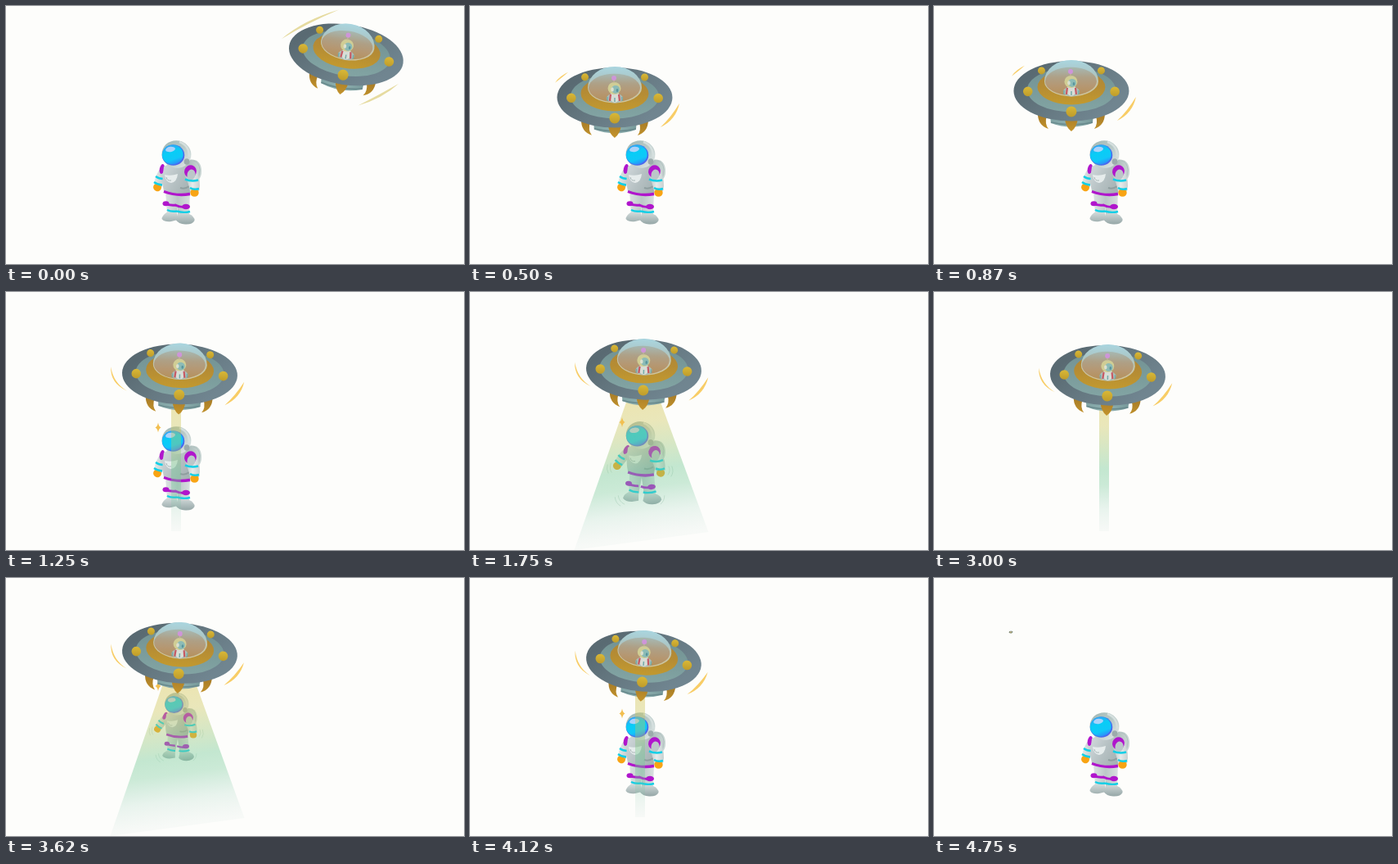
These frames come from a looping animation (560 px wide and 315 px high, 5 s). An HTML page with a canvas:

```html
<!DOCTYPE html>
<html lang="en">
<head>
<meta charset="utf-8">
<title>Abduction</title>
<style>
  html, body { margin: 0; width: 100%; height: 100%; overflow: hidden; background: #fdfdfb; }
  canvas { display: block; }
</style>
</head>
<body>
<canvas id="stage" width="560" height="315"></canvas>
<script>
const g = document.getElementById('stage').getContext('2d');
const LOOP = 5000, STEP = 125;
const HELD = new Set([1, 3, 5, 13, 22, 23, 39]);   // steps that repeat the pose before them
const PURPLE = '#b016cc', CYAN = '#12cfe6', ORANGE = '#f8a414';

const clamp = v => Math.max(0, Math.min(1, v));
const mix = (a, b, f) => a + (b - a) * f;
const easeOut = f => Math.sin(clamp(f) * Math.PI / 2);

// Where the ship is at a step: swoop in, swing back, hover, shrink into the distance.
function flight(s) {
  if (s < 6) {
    const f = easeOut(s / 6);
    return { x: mix(416, 140, f), y: mix(58.5, 105, f) + 14 * Math.sin(s / 6 * Math.PI), tilt: mix(8.7, -1.2, f), scale: 1 };
  }
  if (s < 10) {
    const f = easeOut((s - 6) / 4);
    return { x: mix(140, 213, f), y: mix(105, 99.5, f), tilt: mix(-1.2, 2, f), scale: 1 };
  }
  if (s <= 33) {
    const climb = (from, to, height) => s >= from && s < to ? height * (s - from) / (to - from) : 0;
    return {
      x: 212.5,
      y: 101 - climb(9, 19, 14) - climb(19, 22, 20) - climb(24, 33, 18),
      tilt: 1.6 + .3 * Math.max(0, s - 24),
      scale: 1
    };
  }
  const f = (s - 33) / 5;
  return { x: mix(212.5, 94, f), y: mix(100, 66, easeOut(f)), tilt: 4.3 - 10 * f, scale: 1 - .965 * f * f };
}

// Share of the way from the ground to the ship.
const riseAt = s => Math.pow(clamp((s < 23 ? s - 13 : 32 - s) / 5), 1.5);

// 0 is off, 1 a thin ray, 2 a cone, 3 the full slanted cone.
function beamLevel(s) {
  const pulse = (from, to) => Math.min(s - from, to - s, 3);
  return Math.max(0, pulse(9, 21), pulse(23, 34));
}

function grad(x0, y0, x1, y1, ...colors) {
  const l = g.createLinearGradient(x0, y0, x1, y1);
  colors.forEach((c, i) => l.addColorStop(i / (colors.length - 1), c));
  return l;
}
function ell(x, y, rx, ry, fill, turn = 0) {
  g.beginPath();
  g.ellipse(x, y, rx, ry, turn, 0, 7);
  g.fillStyle = fill;
  g.fill();
}
function shape(d, fill) {
  g.fillStyle = fill;
  g.fill(new Path2D(d));
}
function line(d, color, width) {
  g.strokeStyle = color;
  g.lineWidth = width;
  g.stroke(new Path2D(d));
}
function around(x, y, angle, draw) {
  g.save();
  g.translate(x, y);
  g.rotate(angle);
  g.translate(-x, -y);
  draw();
  g.restore();
}

// Crescent from one point to another, thickest in the middle.
function streak(x1, y1, cx, cy, x2, y2, width, color) {
  const k = 1 - width / Math.hypot(cx, cy);
  shape(`M${x1} ${y1}Q${cx} ${cy} ${x2} ${y2}Q${cx * k} ${cy * k} ${x1} ${y1}Z`, color);
}

function streaks(s) {
  if (s < 4) {
    const pale = '#e6dba0';
    streak(-81, -6, -58, -33, -17 + 10 * s, -52 - 9 * s, 6, pale);
    streak(24, 60, 52 + 20 * s, 47 - 8 * s, 69 + 45 * s, 26 - 24 * s, 6, pale);
    return;
  }
  const warm = '#f8cd66';
  if (s < 8) streak(-73, -17, -68, -25, -57, -30, 4, warm);
  else streak(-84.5, -6, -85, 14, -64, 23, 4, warm);
  streak(56, 37, 75, 28, 79, 8, 7, warm);
}

function pilot() {
  ell(0, 1.5, 10, 6, '#a9bdb8');
  ell(0, 0, 6, 7, '#d9dfd8');
  line('M-5 -3L-6 5M5 -3L6 5', '#c8505c', 2.2);
  line('M-9 0L-9 5M9 0L9 5M0 1L0 6', '#6fa8a8', 1.5);
  ell(-.5, -10.5, 8, 7.5, '#d3cd8d');
  ell(1, -9, 5, 5, '#86b9b4');
  ell(-3, -9, 1.8, 2.6, '#dfe3d0');
  ell(3, -8, 1.3, 2, '#4d8f98');
  line('M-1 -17L-1 -22', '#c6b08f', 1.2);
  ell(-1, -23, 3, 3, '#d585da');
}

function lamp(x, y, r) {
  ell(x, y, r, r, grad(x, y - r, x, y + r, '#d9b837', '#bf9c2a'));
}

function ship(s, { x, y, tilt, scale }) {
  g.save();
  g.translate(x, y);
  g.rotate(tilt * Math.PI / 180);
  g.scale(scale, scale);
  if (s < 38) streaks(s);

  shape('M-26 30L27 30L26 40Q0 49 -25 40Z', grad(-26, 0, 27, 0, '#7fa2a3', '#90b2b2', '#77999a'));
  line('M-25 39Q0 45 26 39', '#698a8d', 1.5);
  const gold = grad(0, 30, 0, 50, '#a87c27', '#c4942c');
  shape('M-41 28Q-41 43 -28 47Q-33 41 -30 31Z', gold);
  shape('M41 28Q41 43 28 47Q33 41 30 31Z', gold);
  shape('M-8 34L8 34Q7 45 0 50Q-7 45 -8 34Z', gold);

  ell(0, .8, 70.5, 36.8, grad(-30, -35, 30, 35, '#596a72', '#667982', '#708590'));
  ell(0, -.5, 54, 27, grad(0, -26, 0, 26, '#729293', '#82a4a3'));
  ell(0, -4, 41.5, 21.5, grad(0, -25, 0, 17, '#b08538', '#b58c34', '#c2992f'));

  const dome = 'M-33 -11A33 26 0 0 1 33 -11A33 18.5 0 0 1 -33 -11Z';
  shape(dome, grad(0, -36, 0, 8, '#a9d3dc', '#a9c4c3', '#c8c4a4', '#cfc59c'));
  ell(-.5, -11, 31.5, 17.2, grad(0, -28, 0, 6, '#a3ada2', '#ac9a7d', '#b4926a', '#b48d55'));
  pilot();
  shape(dome, grad(0, -36, 0, 7, 'rgba(170,215,225,.35)', 'rgba(185,205,205,.12)', 'rgba(200,200,180,.06)'));

  for (const side of [-1, 1]) {
    lamp(36.5 * side, -24, 4.5);
    lamp(53.2 * side, 1.5, 5.8);
  }
  lamp(0, 26, 6.5);
  g.restore();
}

function beam(level, top) {
  if (!level) return;
  const k = level - 1, full = level === 3;
  const mid = 208 + 2 * k, half = 6 + 6.5 * k;
  const foot = 208 + .75 * k, spread = 6 + 76 * easeOut(k / 2);
  const left = full ? 315 : 292, right = full ? 293 : 292;
  const fill = full ? g.createLinearGradient(208, 135, 230, 298) : g.createLinearGradient(0, 140, 0, 292);
  fill.addColorStop(0, 'rgba(212,195,78,.42)');
  fill.addColorStop(.15, 'rgba(204,197,88,.4)');
  fill.addColorStop(.5, 'rgba(115,200,148,.42)');
  fill.addColorStop(.63, 'rgba(115,200,150,.36)');
  fill.addColorStop(.82, 'rgba(125,195,165,.16)');
  fill.addColorStop(1, 'rgba(150,190,180,.06)');
  shape(`M${mid - half} ${top}L${mid + half} ${top}L${foot + spread} ${right}L${foot - spread} ${left}Z`, fill);
}

function legs(spread) {
  const suit = grad(194, 0, 226, 0, '#dde4e4', '#bcc8c8', '#dae1e1');
  const boot = grad(0, 251, 0, 267, '#d5dddd', '#93a5a5');
  around(203, 226, spread, () => {
    shape('M195 226L211 228L209 254L197 253Z', suit);
    shape('M198 251Q191 255 190.5 260Q194 264 202 263L210 261L209 252Z', boot);
    line('M193 241Q200 244 208 243', PURPLE, 2.8);
    ell(195.5, 241.3, 4, 3, PURPLE);
    line('M197 249Q202 251.5 209 250.5', CYAN, 2.4);
  });
  around(217, 226, -spread, () => {
    shape('M209 228L225 226L224 255L210 255Z', suit);
    shape('M210 253.5L223 253.5Q231 257 230.5 262Q228 267 219 266.5Q211 266 207.5 261Z', boot);
    line('M207 243Q214 247 224 245', PURPLE, 2.8);
    ell(220, 245, 5, 3.2, PURPLE);
    line('M209 250.5Q217 253 225 251', CYAN, 2.4);
  });
}

function astronaut(rise) {
  const floating = rise > 0 ? 1 : 0;
  const size = 1 - .85 * rise * rise;
  g.save();
  g.translate(210, 215 - 72 * rise);
  g.scale(size, size);
  g.translate(-210, -215);

  shape('M222 188Q237 185 239 199Q240 212 231 214L222 212Z', grad(222, 0, 240, 0, '#a9bbb9', '#cfdad8'));
  line('M229 189Q236 190 237 200Q237 208 233 212', '#b0c1bf', 1);
  legs(.11 * floating);

  around(192, 200, .27 * floating, () => {
    shape('M190 197Q182 206 181 218L190 222L196 208Z', grad(181, 0, 196, 0, '#e4eaea', '#b9c5c5'));
    ell(190.8, 199, 3, 6, PURPLE, .2);
    line('M183 208Q187 211 192 211', CYAN, 2.4);
    ell(185, 221.5, 5, 4.6, ORANGE, .3);
    line('M181 215Q186 218.5 191 218.5', CYAN, 2.4);
  });

  shape('M193 196Q190 214 193 226Q209 234 225 229Q230 208 224 193Q208 188 193 196Z',
    grad(192, 200, 226, 220, '#cdd5d8', '#b6c1c3', '#a5b2b3'));
  shape('M194 206Q202 208 210 205Q209 215 202 216Q195 215 194 206Z', '#e6ecec');
  line('M196 209Q197 214 202 213', '#aab7b7', 1);
  line('M213 222Q219 224 224 220', '#8f9e9f', 2);
  line('M193 226.5Q209 232.5 225 229.5', PURPLE, 3.4);

  around(226, 200, -.1 * floating, () => {
    shape('M219 201Q226 193 233 201Q239 213 236 226L225 226Q223 215 219 208Z',
      grad(219, 0, 237, 0, '#b9c5c5', '#e6ebeb', '#c6d0d0'));
    ell(225.5, 202, 7.4, 7.8, PURPLE, .3);
    ell(226.5, 206, 5, 6.5, '#bcc7c9', .2);
    line('M219 211.5Q227 215 235 212.5', CYAN, 2.6);
    ell(230.5, 228, 5.2, 4.8, ORANGE);
    line('M225 222Q230 225 236 223', CYAN, 2.6);
  });

  ell(208.5, 181, 18, 16.8, grad(195, 165, 224, 196, '#a3bab6', '#b9c9c7', '#e0e7e6'), .2);
  line('M212 166Q224 170 224 184', '#d5dfde', 2.5);
  ell(221, 190, 3.4, 3.8, '#9cabac');
  ell(204.5, 182, 13.8, 12.8, grad(195, 175, 215, 192, '#2b9cf2', '#4f62ec'));
  ell(203.8, 181.5, 12.8, 11.8, grad(200, 170, 209, 195, '#2ea5f6', '#08cdf6', '#10c8f8', '#3a76fa'));
  ell(201, 175, 6, 3.2, 'rgba(206,216,252,.8)', -.15);

  if (floating) {
    line('M172 215Q170 223 173 227M168 217Q166 223 169 228M243 219Q246 225 242 230M247 219Q250 226 246 232'
      + 'M181 255Q182 263 189 266M177 257Q178 265 184 268M238 255Q238 262 233 266', 'rgba(150,185,165,.4)', .9);
  }
  g.restore();
}

function sparkle(x, y, r) {
  const q = r * .15, w = r * .6;
  shape(`M${x} ${y - r}Q${x + q} ${y - q} ${x + w} ${y}Q${x + q} ${y + q} ${x} ${y + r}`
    + `Q${x - q} ${y + q} ${x - w} ${y}Q${x - q} ${y - q} ${x} ${y - r}Z`, '#f2bf50');
}

function render(time) {
  let s = Math.floor((time + 5) / STEP) % 40;
  while (HELD.has(s)) s--;
  const pose = flight(s), rise = riseAt(s), level = beamLevel(s);
  const aboard = s > 18 && s < 27;

  g.fillStyle = '#fdfdfb';
  g.fillRect(0, 0, 560, 315);
  if (!aboard) astronaut(rise);
  beam(level, pose.y + 35);
  if (level && rise < .5) sparkle(186, 165.5 - 72 * rise, 6);
  ship(s, pose);
}

function tick() {
  render(performance.now() % LOOP);
  requestAnimationFrame(tick);
}
tick();
</script>
</body>
</html>
```
